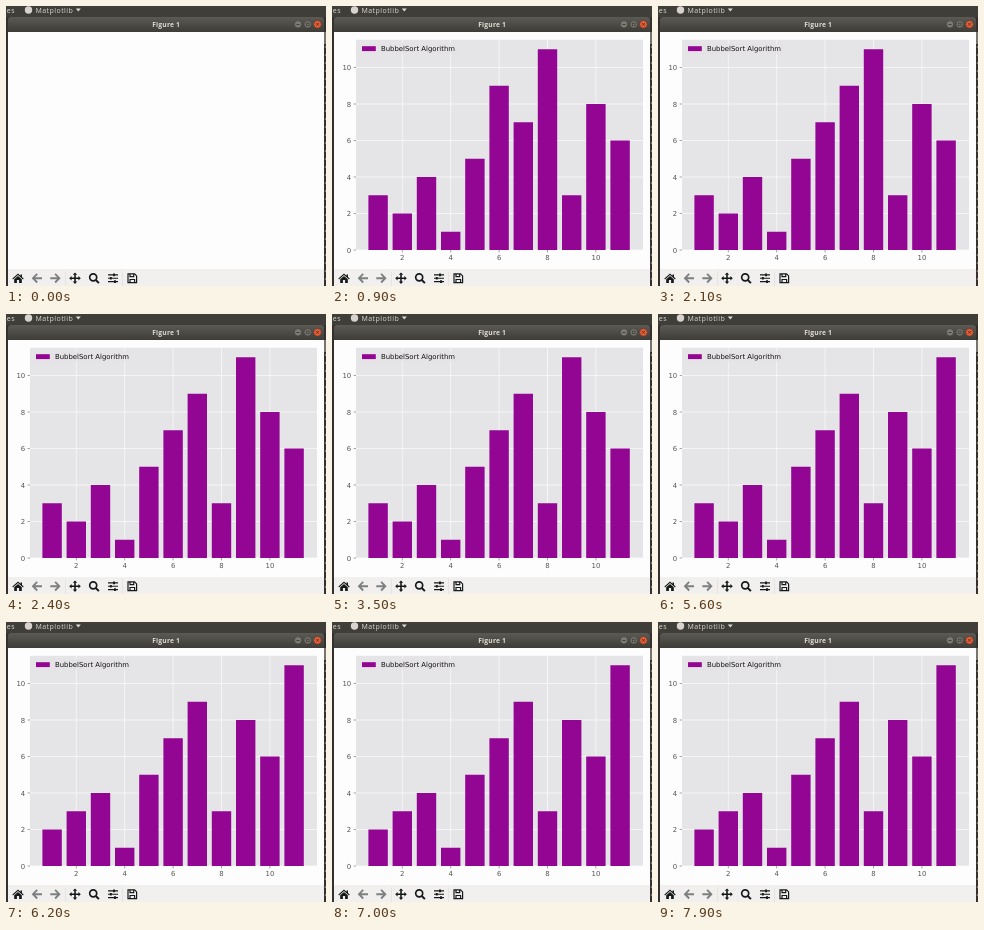
Recreate the animation shown at these times as an HTML page. Size 320x280 px, loop 8 s.

```html
<!DOCTYPE html>
<html lang="en">
<head>
<meta charset="utf-8">
<title>Bubble sort chart</title>
<style>
  html, body { margin: 0; width: 100%; height: 100%; overflow: hidden; background: #fefefe; }
  svg { display: block; width: 320px; height: 280px; }
  .ui { font-family: "Open Sans", "Noto Sans", sans-serif; fill: #dfdbd2; }
  .plot { font: 6.9px "DejaVu Sans", sans-serif; }
  .tick { fill: #555; }
</style>
</head>
<body>
<svg viewBox="0 0 320 280">
  <defs>
    <linearGradient id="title" x2="0" y2="1">
      <stop offset="0" stop-color="#5b5a54"/>
      <stop offset="1" stop-color="#3d3c37"/>
    </linearGradient>
  </defs>

  <rect width="320" height="280" fill="#34302f"/>
  <path d="M319.3 40V280" stroke="#8b7f87" stroke-width="1" stroke-dasharray="2 6"/>
  <path d="M319 26V38" stroke="#77736f" stroke-width="2"/>

  <!-- desktop panel -->
  <rect width="320" height="11" fill="#3f3e39"/>
  <g class="ui" font-size="7" letter-spacing=".45">
    <text x="9" y="6.6" text-anchor="end">ies</text>
    <circle cx="22.5" cy="4" r="3.7" fill="#d9d3d0"/>
    <text x="29.5" y="6.6" textLength="">Matplotlib</text>
    <path d="M69.8 2.6h5l-2.5 3z"/>
  </g>

  <!-- title bar -->
  <path d="M2 26V14q0-3 3-3H315q3 0 3 3V26z" fill="url(#title)"/>
  <text class="ui" x="160.2" y="20.6" font-size="6.7" font-weight="700" letter-spacing=".2" text-anchor="middle">Figure 1</text>
  <g stroke="#3a3934" stroke-width=".6">
    <circle cx="292" cy="18.3" r="3.7" fill="#7b7a73"/>
    <circle cx="301.7" cy="18.3" r="3.7" fill="#7b7a73"/>
    <circle cx="311.5" cy="18.3" r="3.9" fill="#ee5a31"/>
  </g>
  <path d="M290.4 18.5h3.2M300.3 17h2.8v2.7h-2.8zM310.1 16.9l2.8 2.8m0-2.8l-2.8 2.8" fill="none" stroke="#37352f" stroke-width=".8"/>

  <rect x="2" y="26" width="316" height="237" fill="#fefdfe"/>

  <g id="chart" class="plot">
    <rect x="24" y="33.7" width="287" height="210.3" fill="#e5e4e6"/>
    <g id="axes"></g>
    <g id="bars" fill="#930693"></g>
    <rect x="28" y="37" width="98" height="11" rx="1" fill="#e5e4e6" opacity=".8"/>
    <rect x="30" y="40.2" width="13.8" height="4.9" fill="#930693"/>
    <text x="49" y="45.2" fill="#111">BubbelSort Algorithm</text>
  </g>

  <!-- toolbar -->
  <rect x="2" y="263" width="316" height="17" fill="#f1f0ee"/>
  <path d="M59.5 265V280M116.5 265V280" stroke="#e3e1de" stroke-width=".8"/>
  <g fill="#16191a">
    <path d="M6.4 272.6L12 267.6l2.5 2.2v-1.4h1.5v2.7l1.7 1.5-.7.8-5-4.4-5 4.4z"/>
    <path d="M8.2 273.3l3.8-3.3 3.8 3.3v3.7h-2.7v-2.9h-2.2v2.9H8.2z"/>
    <path d="M69 266.4l2.2 2.4h-1.4v2.6h2.6V270l2.4 2.2-2.4 2.2V273h-2.6v2.6h1.4L69 278l-2.2-2.4h1.4V273h-2.6v1.4l-2.4-2.2 2.4-2.2v1.4h2.6v-2.6h-1.4z"/>
  </g>
  <g fill="none" stroke="#7d8080" stroke-width="1.9">
    <path id="arrow" d="M36 272.2H27.4M31.2 267.9L27 272.2l4.2 4.3"/>
    <use href="#arrow" transform="matrix(-1 0 0 1 80.3 0)"/>
  </g>
  <g fill="none" stroke="#16191a">
    <circle cx="87.2" cy="271.3" r="3.5" stroke-width="1.7"/>
    <path d="M89.8 274l3.1 3.1" stroke-width="2"/>
    <path d="M102 268.9h10M102 272.2h10M102 275.6h10" stroke-width="1.1"/>
    <path d="M108 267.6v2.6M104.8 270.9v2.6M109 274.3v2.6" stroke-width="1.9"/>
    <path d="M122 267.9h6.6l2 2v6.8H122zM124 268v2.6h3.7V268M124 276.5v-3h4.6v3" stroke-width="1.2"/>
  </g>
</svg>

<script>
const LOOP = 8000, CHART_AT = 900;
const START = [3, 2, 4, 1, 5, 9, 7, 11, 3, 8, 6];
// [time in ms, index of the left bar of the swapped pair]
const SWAPS = [[2100, 5], [2400, 7], [4400, 8], [5600, 9], [6100, 0]];

const $ = id => document.getElementById(id);
const X = v => 21.9 + 24.2 * v;
const Y = v => 244 - 18.25 * v;

function add(parent, tag, attrs, text = '') {
  const el = document.createElementNS('http://www.w3.org/2000/svg', tag);
  for (const key in attrs) el.setAttribute(key, attrs[key]);
  el.textContent = text;
  return parent.appendChild(el);
}

function tick(x, y, grid, mark, anchor, label) {
  add($('axes'), 'path', { d: grid, stroke: '#fcfcfc', 'stroke-width': .7 });
  add($('axes'), 'path', { d: mark, stroke: '#666', 'stroke-width': .6 });
  add($('axes'), 'text', { x, y, class: 'tick', 'text-anchor': anchor }, label);
}

for (let v = 0; v <= 10; v += 2) {
  const x = X(v), y = Y(v);
  tick(19.2, y + 2.6, `M24 ${y}H311`, `M21.6 ${y}H24`, 'end', v);
  if (v) tick(x, 254.3, `M${x} 33.7V244`, `M${x} 244v2.4`, 'middle', v);
}

const bars = START.map((_, i) =>
  add($('bars'), 'rect', { x: X(i + 1) - 9.7, width: 19.4 }));

function valuesAt(t) {
  const a = [...START];
  for (const [at, i] of SWAPS) {
    if (t >= at) [a[i], a[i + 1]] = [a[i + 1], a[i]];
  }
  return a;
}

function draw(now) {
  const t = now % LOOP;
  $('chart').style.display = t < CHART_AT ? 'none' : '';
  valuesAt(t).forEach((v, i) => {
    bars[i].setAttribute('y', Y(v));
    bars[i].setAttribute('height', 244 - Y(v));
  });
  requestAnimationFrame(draw);
}
draw(performance.now());
</script>
</body>
</html>
```
